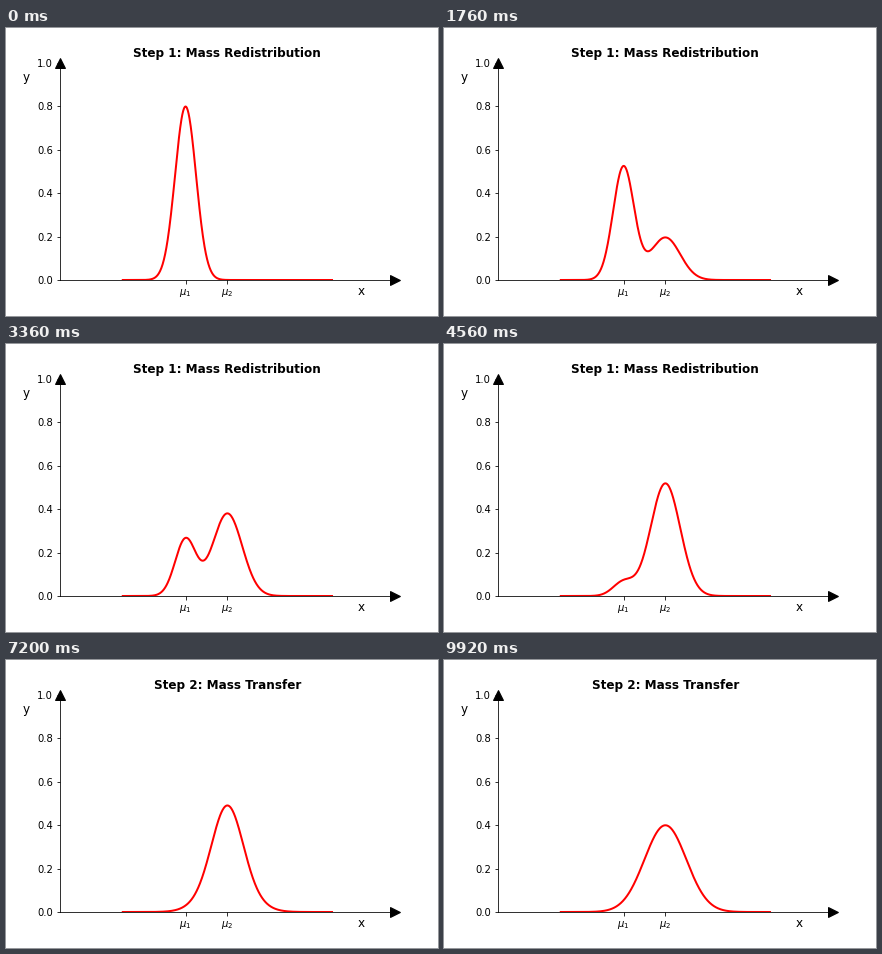
A matplotlib script for the animation above (10000 ms loop, 432 by 288 pixels).

```python
import numpy as np
import matplotlib.pyplot as plt
from matplotlib.animation import FuncAnimation

MU1, MU2 = 0, 2
STEPS = 50  # per phase

plt.rcParams["font.family"] = "DejaVu Sans"


def normal(x, mu, var):
    return np.exp(-(x - mu) ** 2 / (2 * var)) / np.sqrt(2 * np.pi * var)


x = np.linspace(-3, 7, 500)
start = normal(x, MU1, 0.25)
middle = normal(x, MU2, 0.5)
end = normal(x, MU2, 1)

# Both phases include t = 1, so the curve rests there briefly
times = np.concatenate([np.linspace(0, 1, STEPS), np.linspace(1, 2, STEPS)])

fig, ax = plt.subplots(figsize=(6, 4), dpi=72)
fig.subplots_adjust(left=0.125, right=0.9, bottom=0.125, top=0.88)
ax.set(xlim=(-6, 10), ylim=(0, 1))
ax.set_xticks([MU1, MU2], [r"$\mu_1$", r"$\mu_2$"])
ax.spines[["top", "right"]].set_visible(False)

ax.plot(1, 0, ">k", ms=10, transform=ax.transAxes, clip_on=False)
ax.plot(0, 1, "^k", ms=10, transform=ax.transAxes, clip_on=False)

ax.set_xlabel("x", fontsize=12)
ax.xaxis.set_label_coords(0.9, -0.025)
ax.set_ylabel("y", fontsize=12, rotation=0)
ax.yaxis.set_label_coords(-0.1, 0.9)

title = ax.set_title("", fontsize=12, fontweight="bold")
curve, = ax.plot([], [], color="red", lw=2)


def update(i):
    t = times[i]
    if t < 1:
        title.set_text("Step 1: Mass Redistribution")
        y = (1 - t) * start + t * middle
    else:
        title.set_text("Step 2: Mass Transfer")
        y = (2 - t) * middle + (t - 1) * end
    curve.set_data(x, y)
    return curve, title


anim = FuncAnimation(fig, update, frames=len(times), interval=100,
                     repeat=True, repeat_delay=0, blit=False)
plt.show()
```
